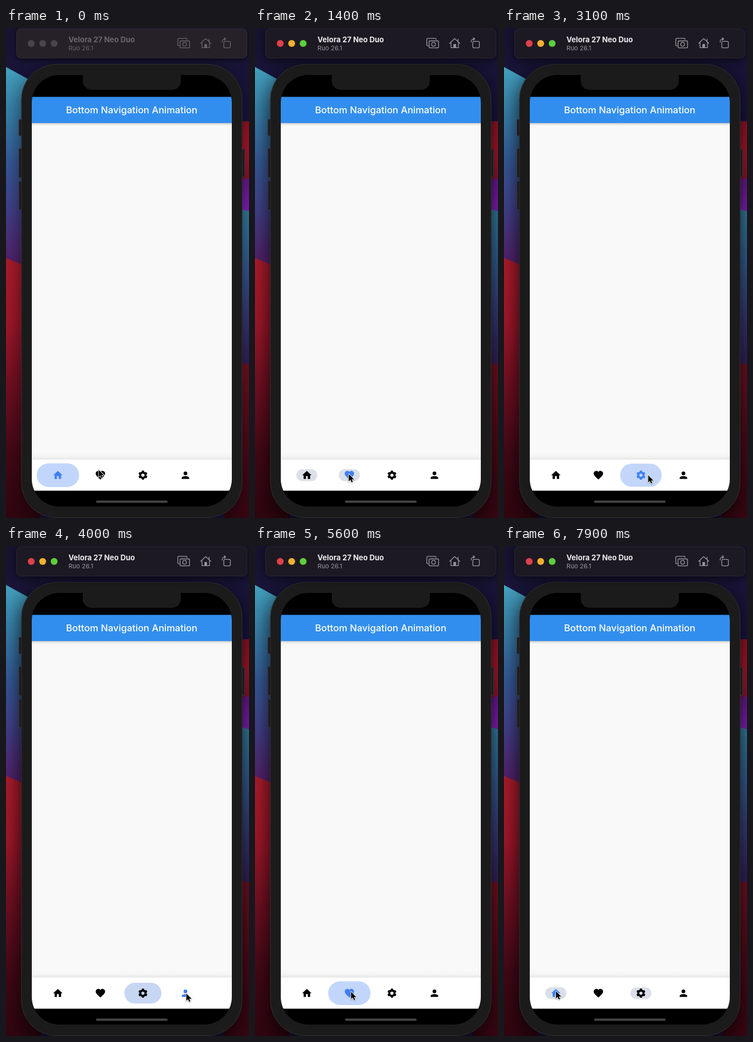
These frames come from a looping animation (424x856 px, 8000 ms). An HTML page with a canvas:

```html
<!DOCTYPE html>
<html lang="en">
<head>
<meta charset="utf-8">
<title>Bottom Navigation Animation</title>
<style>
html, body { margin: 0; width: 100%; height: 100%; overflow: hidden; background: #15112f; }
canvas { display: block; width: 424px; height: 856px; }
</style>
</head>
<body>
<canvas id="stage" width="424" height="856"></canvas>
<script>
const ctx = document.getElementById('stage').getContext('2d');
const W = 424, H = 856;
const LOOP = 8000;
const PILL_MS = 400;
const GLIDE_MS = 550;
const ACTIVE_AT = 1200;
const BAR_Y = 781.2;
const BLUE = '#4180f2';
const TAU = Math.PI * 2;
const screen = { x: 45, y: 82, w: 349, h: 754, r: 48 };

const tabX = n => 90.5 + 74.2 * n;

// [time, tab]
const taps = [[-1000, 0], [1200, 1], [2710, 2], [3950, 3], [5200, 1], [6464, 2], [7700, 0]];

// [arrival time, x, y]: the pointer glides to each spot and rests there
const stops = [
  [0, 161, 771], [600, 161, 778.5], [1900, 242, 781], [3050, 251, 780.5],
  [3800, 314, 781], [5000, 167, 778], [6300, 248, 784], [7650, 90, 777]
];

const home = new Path2D('M10 20V14H14V20H19V12H22L12 3 2 12H5V20Z');
const heart = new Path2D('M12 21.3C5 15 2 12.3 2 8.5A5.5 5.5 0 0 1 12 5.1A5.5 5.5 0 0 1 22 8.5C22 12.3 19 15 12 21.3Z');
const person = new Path2D('M4 20V18C4 15.3 9.3 14 12 14S20 15.3 20 18V20Z');
person.arc(12, 8, 4, 0, TAU);
const icons = [home, heart, gear(), person];
const arrow = new Path2D('M0 0V14.6L3.5 11.4 5.8 16.6 8.2 15.5 5.9 10.5H10.6Z');

function gear() {
  const p = new Path2D();
  for (let tooth = 0; tooth < 6; tooth++) {
    for (const [turn, r] of [[-20, 7.8], [-13, 9.9], [13, 9.9], [20, 7.8]]) {
      const a = (tooth * 60 + turn) * TAU / 360;
      p.lineTo(12 + r * Math.sin(a), 12 - r * Math.cos(a));
    }
  }
  p.closePath();
  p.moveTo(15.4, 12);
  p.arc(12, 12, 3.4, 0, TAU);
  return p;
}

function box(x, y, w, h, r, fill, stroke) {
  ctx.beginPath();
  ctx.roundRect(x, y, w, h, r);
  if (fill) { ctx.fillStyle = fill; ctx.fill(); }
  if (stroke) { ctx.strokeStyle = stroke; ctx.stroke(); }
}

function rect(x, y, w, h, fill) {
  ctx.fillStyle = fill;
  ctx.fillRect(x, y, w, h);
}

function fade(y0, y1, ...colors) {
  const g = ctx.createLinearGradient(0, y0, 0, y1);
  colors.forEach((c, i) => g.addColorStop(i / (colors.length - 1), c));
  return g;
}

function label(text, x, y, font, color) {
  ctx.font = font + ' Inter, sans-serif';
  ctx.fillStyle = color;
  ctx.fillText(text, x, y);
}

function shadowed(alpha, blur, dy, paint) {
  ctx.save();
  ctx.shadowColor = `rgba(0,0,0,${alpha})`;
  ctx.shadowBlur = blur;
  ctx.shadowOffsetY = dy;
  paint();
  ctx.restore();
}

// A colour field with a slanted top edge; later bands cover its lower part.
function band(x, y, slope, end, ...colors) {
  ctx.beginPath();
  ctx.moveTo(x, y);
  ctx.lineTo(x + 60, y + 60 * slope);
  ctx.lineTo(x + 60, H);
  ctx.lineTo(x, H);
  ctx.fillStyle = fade(y, end, ...colors);
  ctx.fill();
}

function wallpaper() {
  rect(0, 0, W, H, fade(0, 163, '#17132f', '#1a1545'));
  band(0, 68, 0.55, 405, '#43a0bd', '#3881ad', '#365a9a', '#43408c', '#54236f');
  band(0, 402, 0.4, H, '#b01c2c', '#a3172a', '#720f22', '#460817', '#30050f');
  band(380, 163, 0, 264, '#9c1428', '#b5152d', '#94132e');
  band(380, 269, -0.15, 318, '#6d1c96', '#8b20c4');
  band(380, 307, 0.3, 588, '#3588a6', '#35669c', '#383f80', '#35205f');
  band(380, 575, 0.3, H, '#7c1124', '#540a1b', '#380612');
}

function toolIcons(color) {
  ctx.strokeStyle = color;
  ctx.lineWidth = 1.3;
  ctx.lineJoin = ctx.lineCap = 'round';
  box(303.7, 22.5, 16.6, 12.2, 2, null, color);
  box(308.3, 27.4 - 2.3, 6.6, 6.6, 3.3, null, color);
  ctx.stroke(new Path2D('M302 31Q299.7 31 299.7 29V20Q299.7 18.2 301.5 18.2H314Q316 18.2 316 20'));
  ctx.stroke(new Path2D('M339.6 26.8L348.4 18.6 357.4 26.8M342 25V34.4H355V25M354.4 19.5V23'));
  rect(346.3, 28, 4.4, 6.4, color);
  box(380, 23.3, 11.5, 11.3, 2, null, color);
  ctx.stroke(new Path2D('M377.2 24.5Q377 19 383 19M381 16.9L383.3 19 381 21.2'));
}

function titleBar(active) {
  shadowed(0.6, active ? 18 : 8, 3, () =>
    box(18, 1, 403, 52, 8, active ? '#1d1922' : '#262129'));
  ctx.lineWidth = 1;
  box(18.5, 1.5, 402, 51, 8, null, active ? '#2a2630' : '#302b34');
  const dots = active ? ['#e0404a', '#f0b030', '#5bd03c'] : Array(3).fill('#48444b');
  dots.forEach((c, i) => box(38 + 20 * i, 21, 12, 12, 6, c));
  label('Velora 27 Neo Duo', 109, 25, '700 12.9px', active ? '#efedf0' : '#6b666e');
  label('Ruo 26.1', 109, 39, '400 11px', active ? '#99959c' : '#68636b');
  toolIcons(active ? '#9b979e' : '#69646c');
}

function sideButton(x, y, h) {
  box(x + 0.5, y + 0.5, 6, h - 1, 1.5, '#1c1b1e', '#38363b');
}

function phone(active) {
  ctx.lineWidth = 1;
  shadowed(active ? 0.85 : 0.6, 38, 10, () => box(27, 63.5, 385, 792, 61, '#1b1b1b'));
  sideButton(22, 159, 30);
  sideButton(22, 210, 52);
  sideButton(22, 267, 51);
  sideButton(410, 211, 50);
  box(27, 63.5, 385, 792, 61, '#1b1b1b', '#302f33');
  box(screen.x, screen.y, screen.w, screen.h, screen.r, '#000');
  box(134, 81, 171, 27, [0, 0, 15, 15], '#1b1b1b');
  box(157, 825.5, 125, 4, 2, '#444');
}

// Pill colour runs from transparent black to translucent blue.
function pill(tab, k) {
  if (k <= 0) return;
  const [r, g, b] = [70, 131, 243].map(c => Math.round(c * k));
  const w = 74 * k, h = 41.5 * k;
  box(tabX(tab) - w / 2, BAR_Y - h / 2, w, h, h / 2, `rgba(${r},${g},${b},${0.33 * k})`);
}

function navBar(t) {
  const i = taps.findLastIndex(([at]) => at <= t);
  const [at, tab] = taps[i];
  const k = Math.min(1, (t - at) / PILL_MS);
  if (i > 0) pill(taps[i - 1][1], 1 - k);
  pill(tab, k);
  icons.forEach((path, n) => {
    ctx.save();
    ctx.translate(tabX(n), BAR_Y);
    ctx.scale(0.815, 0.815);
    ctx.translate(-12, -12);
    ctx.fillStyle = n === tab ? BLUE : '#000';
    ctx.fill(path, 'evenodd');
    ctx.restore();
  });
}

function app(t) {
  const { x, y, w, h, r } = screen;
  ctx.save();
  ctx.beginPath();
  ctx.roundRect(x, y, w, h, r);
  ctx.clip();
  rect(x, 166, w, 600, '#f9f9f9');
  rect(x, 166, w, 5, fade(166, 171, 'rgba(0,0,0,.2)', 'rgba(0,0,0,.07)', 'rgba(0,0,0,0)'));
  rect(x, 120.3, w, 45.7, '#328eee');
  ctx.textAlign = 'center';
  ctx.letterSpacing = '0.06px';
  label('Bottom Navigation Animation', 219.3, 149, '500 16.4px', '#fff');
  rect(x, 742, w, 12, fade(742, 754, 'rgba(0,0,0,0)', 'rgba(0,0,0,.02)', 'rgba(0,0,0,.07)'));
  rect(x, 754, w, 54.3, '#fff');
  navBar(t);
  ctx.restore();
}

function drawPointer(t) {
  let [, x, y] = stops[0];
  for (const [arrive, toX, toY] of stops) {
    const u = Math.min(1, Math.max(0, 1 - (arrive - t) / GLIDE_MS));
    const e = u * u * (3 - 2 * u);
    x += (toX - x) * e;
    y += (toY - y) * e;
  }
  shadowed(0.35, 2, 1, () => {
    ctx.translate(x + 0.6, y + 0.8);
    ctx.scale(0.87, 0.87);
    ctx.lineJoin = 'round';
    ctx.lineWidth = 2;
    ctx.strokeStyle = '#fff';
    ctx.stroke(arrow);
    ctx.shadowColor = 'transparent';
    ctx.fillStyle = '#000';
    ctx.fill(arrow);
  });
}

function draw(t) {
  const active = t >= ACTIVE_AT;
  wallpaper();
  phone(active);
  titleBar(active);
  app(t);
  drawPointer(t);
}

const start = performance.now();
function tick() {
  draw((performance.now() - start) % LOOP);
  requestAnimationFrame(tick);
}
tick();
</script>
</body>
</html>
```
